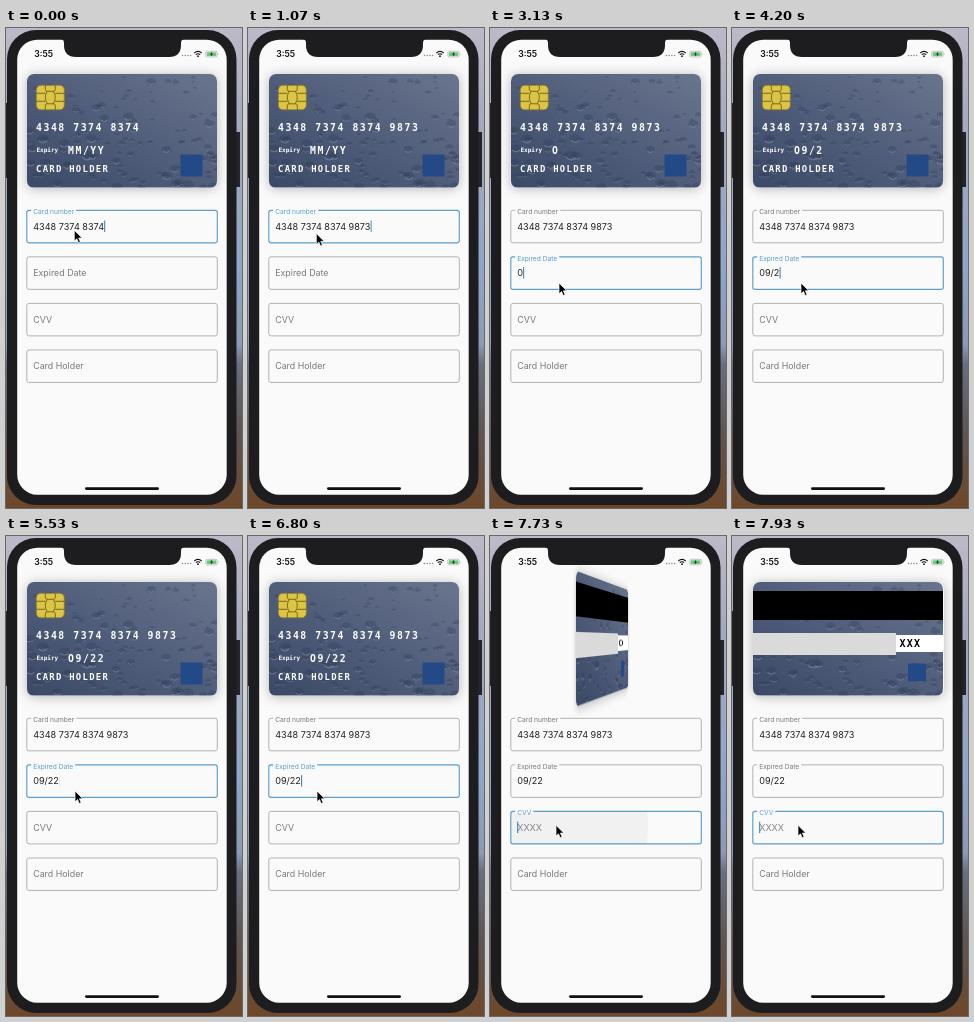
Write an HTML page that moves like this. It is 236 by 480 pixels and loops after 8 s.

```html
<!DOCTYPE html>
<html lang="en">
<head>
<meta charset="utf-8">
<title>Card form</title>
<style>
  html, body { margin: 0; width: 100%; height: 100%; overflow: hidden; background: #55505a; }
  svg { position: absolute; left: 0; top: 0; }
  text { font-family: Inter, Roboto, sans-serif; white-space: pre; }
  #card { position: absolute; left: 20.5px; top: 46px; width: 190.5px; height: 113.5px; perspective: 557px; }
  .face { position: absolute; inset: 0; border-radius: 7px; overflow: hidden; box-shadow: 0 1px 12px #0004; }
  .mono { font-family: "DejaVu Sans Mono", "Noto Sans Mono", monospace; font-weight: 700; fill: #fff; }
  .num { font-size: 9.8px; letter-spacing: 1.54px; }
</style>
</head>
<body>
<svg id="stage" width="236" height="480">
  <defs>
    <linearGradient id="wall" x2="0" y2="1">
      <stop offset="0" stop-color="#bdb9c8"/>
      <stop offset=".2" stop-color="#a3a9bf"/>
      <stop offset=".5" stop-color="#8ea6c8"/>
      <stop offset=".66" stop-color="#8b9ab5"/>
      <stop offset=".7" stop-color="#686f80"/>
      <stop offset=".84" stop-color="#5f5553"/>
      <stop offset="1" stop-color="#6d4729"/>
    </linearGradient>
    <linearGradient id="sky" x1="0" y1="1" x2="1" y2="0">
      <stop offset="0" stop-color="#3b4866"/>
      <stop offset=".5" stop-color="#515e7b"/>
      <stop offset="1" stop-color="#6a758d"/>
    </linearGradient>
    <symbol id="photo" viewBox="0 0 190.5 113.5">
      <rect width="191" height="114" fill="url(#sky)"/>
      <g id="drops"></g>
    </symbol>
  </defs>
  <rect width="236" height="480" fill="url(#wall)"/>
  <path d="M0 75h4v75h-4zM229 104h5v55h-5z" fill="#24242a"/>
  <rect x="1" y="2" width="229.5" height="475" rx="29" fill="#1d1d20"/>
  <rect x="11.2" y="11.700" width="209.500" height="455" rx="20" fill="#fafafa"/>
  <path d="M54 11q4 0 4 4v2q0 12 12 12h93q12 0 12-12v-2q0-4 4-4z" fill="#1d1d20"/>
  <text x="28.2" y="29" font-size="8.7" font-weight="600" fill="#111">3:55</text>
  <g fill="#8e8e8e">
    <circle cx="176.5" cy="27.5" r=".8"/><circle cx="179.2" cy="27.5" r=".8"/>
    <circle cx="181.9" cy="27.5" r=".8"/><circle cx="184.6" cy="27.5" r=".8"/>
  </g>
  <path d="M188.3 25q3.7-3.2 7.4 0M189.8 26.7q2.2-1.9 4.4 0" fill="none" stroke="#111" stroke-width="1.1"/>
  <circle cx="192" cy="28.2" r=".9" fill="#111"/>
  <rect x="199.8" y="23.3" width="11.4" height="5.6" rx="1.5" fill="#fff" stroke="#999" stroke-width=".6"/>
  <rect x="200.7" y="24.2" width="9.6" height="3.8" rx=".8" fill="#6cc97a"/>
  <path d="M206.2 23.4l-2.2 3h1.4l-.6 2.4 2.3-3.1h-1.4z" fill="#222"/>
  <path d="M212 25.2q1 .9 0 1.8z" fill="#999"/>
  <rect x="79" y="459.3" width="74" height="2.6" rx="1.3" fill="#111"/>
  <g id="form"></g>
  <path id="mouse" d="M0 0v10.8l2.5-2.3 1.7 4 1.9-.8-1.7-3.9h3.4z" fill="#000" stroke="#fff" stroke-width=".7"/>
</svg>

<div id="card">
  <div class="face" id="front">
    <svg width="191" height="114">
      <use href="#photo" width="190.5" height="113.5"/>
      <g transform="translate(9.3 11.3)" stroke="#5d531c" stroke-width=".8" fill="none">
        <rect width="28" height="24.500" rx="4.500" fill="#dcc545" stroke="#8a7a2c"/>
        <path d="M0 8h9M0 16h9M19 8h9M19 16h9M9 0v4q0 2 2 2h6q2 0 2-2v-4M9 24.500v-4q0-2 2-2h6q2 0 2 2v4M11 6q-4 6 0 12.500M17 6q4 6 0 12.500"/>
      </g>
      <text class="mono num" id="number" x="9" y="57"></text>
      <text class="mono" x="9.5" y="78.300" font-size="6">Expiry</text>
      <text class="mono num" id="expiry" x="41" y="79.600"></text>
      <text class="mono" x="9" y="97.500" font-size="8.900" letter-spacing="1.3">CARD HOLDER</text>
      <rect x="153.500" y="80.500" width="22" height="22" fill="#234a86"/>
    </svg>
  </div>
  <div class="face" id="back">
    <svg width="191" height="114">
      <use href="#photo" width="190.5" height="113.5"/>
      <rect y="9" width="191" height="29" fill="#000"/>
      <rect y="51" width="143" height="22" fill="#dadada"/>
      <rect x="143" y="53" width="48" height="17" fill="#fff"/>
      <text class="mono" x="146.500" y="65.300" font-size="10" letter-spacing="1.2" style="fill:#000">XXX</text>
      <rect x="155" y="81.500" width="18" height="18" fill="#234a86"/>
    </svg>
  </div>
</div>

<script>
const $ = id => document.getElementById(id);
const clamp = x => Math.max(0, Math.min(1, x));
const span = (t, a, b) => clamp((t - a) / (b - a));
const smooth = x => x * x * (3 - 2 * x);
const mix = (a, b, k) => a + (b - a) * k;
const blend = (a, b, k) => `rgb(${a.map((v, i) => Math.round(mix(v, b[i], k)))})`;

function add(parent, tag, attrs) {
  const el = document.createElementNS('http://www.w3.org/2000/svg', tag);
  set(el, attrs);
  return parent.appendChild(el);
}
function set(el, attrs) {
  for (const key in attrs) el.setAttribute(key, attrs[key]);
}

// Water drops: dark lens with a pale lower rim, larger towards the bottom
let seed = 11;
const rnd = () => (seed = seed * 16807 % 2147483647) / 2147483647;
for (let i = 0; i < 130; i++) {
  const x = rnd() * 190, y = 3 + rnd() ** .75 * 110, r = .8 + rnd() ** 3 * 3 + y / 65;
  add($('drops'), 'ellipse', { cx: x, cy: y, rx: r * 1.35, ry: r, fill: '#2b3a56', opacity: .3 });
  add($('drops'), 'path', {
    d: `M${x - r} ${y + r * .4}q${r} ${r * .9} ${r * 2} 0`,
    fill: 'none', stroke: '#a4b0c4', 'stroke-width': r * .3, opacity: .4
  });
}

const TAP_DATE = 1600, TAP_CVV = 7470, FOCUS_LAG = 50, LEFT = 27.2;
const GREY = [160, 160, 160], BLUE = [92, 158, 204], LABEL = [122, 122, 122];
const NUMBER = '4348 7374 8374 9873';
const numberKeys = [70, 230, 400, 530];
const dateKeys = [[3000, '0'], [3270, '09'], [3800, '09/2'], [4500, '09/22']];

// Each field is focused from its tap until the next one
const fields = [
  { label: 'Card number', hint: '', from: -1000, to: TAP_DATE },
  { label: 'Expired Date', hint: 'MM/YY', from: TAP_DATE, to: TAP_CVV },
  { label: 'CVV', hint: 'XXXX', from: TAP_CVV, to: 9000 },
  { label: 'Card Holder', hint: '', from: 9000, to: 9999 }
];

fields.forEach((f, i) => {
  const g = add($('form'), 'g', { transform: `translate(0 ${182.3 + i * 46.55})` });
  f.box = add(g, 'rect', { x: 20.8, y: 0, width: 190.5, height: 32.5, rx: 2.2, fill: 'none' });
  const clip = add(g, 'svg', { x: 21, width: 190.3, height: 32.5 });
  f.ripple = add(clip, 'circle', { cx: i == 1 ? 48 : 46, cy: i == 1 ? 26 : 14 });
  f.gap = add(g, 'rect', { x: 25.2, y: -1.5, height: 3.5, fill: '#fafafa' });
  const line = { x: LEFT, y: 19.3, 'font-size': 9.08 };
  f.hintEl = add(g, 'text', { ...line, fill: '#858585' });
  f.hintEl.textContent = f.hint;
  f.value = add(g, 'text', { ...line, fill: '#222' });
  f.name = add(g, 'text', { x: LEFT });
  f.name.textContent = f.label;
  f.caret = add(g, 'rect', { y: 10.3, width: 1, height: 11.4, fill: '#2f79b5' });
});

function caretAlpha(age) {
  const p = age % 1000;
  if (p < 250) return age < 1000 ? 1 : p / 250;
  return 1 - span(p, 500, 750);
}

function drawField(f, t, text, lastKey) {
  const start = f.from + FOCUS_LAG;
  const lift = smooth(span(t, start, start + 170));
  const lit = lift * (1 - smooth(span(t, f.to, f.to + 130)));
  const size = mix(8.85, 6.65, lift);
  set(f.box, { stroke: blend(GREY, BLUE, lit), 'stroke-width': mix(.8, 1.15, lit) });
  set(f.name, { y: mix(16, 1.3, lift) + size * .36, 'font-size': size, fill: blend(LABEL, BLUE, lit) });
  set(f.gap, { width: lift * (f.name.getComputedTextLength() + 4) });
  const age = t - f.from;
  set(f.ripple, {
    r: Math.max(0, 18 + age * .28),
    'fill-opacity': f.from > 0 && age > 0 ? .055 * (1 - span(age, 150, 480)) : 0
  });
  set(f.hintEl, { opacity: text ? 0 : lift });
  f.value.textContent = text;
  const reset = Math.max(lastKey, start + 60);
  const active = t >= start + 30 && t < f.to;
  set(f.caret, {
    x: LEFT + (text ? f.value.getComputedTextLength() + .2 : 0),
    opacity: active ? caretAlpha(Math.max(0, t - reset)) : 0
  });
}

function turn(el, angle, visible) {
  el.style.visibility = visible ? 'visible' : 'hidden';
  el.style.transform = `rotateY(${angle}deg)`;
}

function draw(t) {
  const typed = numberKeys.filter(k => k <= t);
  const number = NUMBER.slice(0, typed.length ? 15 + typed.length : 14);
  const [dateKey, date] = dateKeys.filter(k => k[0] <= t).pop() || [0, ''];
  $('number').textContent = number;
  // The embossed zero is open, without a dot or slash
  $('expiry').textContent = date.replace('0', 'O') || 'MM/YY';
  drawField(fields[0], t, number, typed.pop() || 0);
  drawField(fields[1], t, date, dateKey);
  drawField(fields[2], t, '', 0);
  drawField(fields[3], t, '', 0);

  const down = smooth(span(t, 1000, 1470)), next = smooth(span(t, 6870, 7330));
  set($('mouse'), { transform: `translate(${68.3 + down * .7 - next * 3} ${202.3 + down * 52.7 + next * 34.3})` });

  const out = span(t, 7500, 7712) ** 2, home = (1 - span(t, 7712, 7924)) ** 2;
  turn($('front'), -90 * out, out < 1);
  turn($('back'), 90 * home, out >= 1);
}

function tick() {
  draw(performance.now() % 8000);
  requestAnimationFrame(tick);
}
tick();
</script>
</body>
</html>
```
